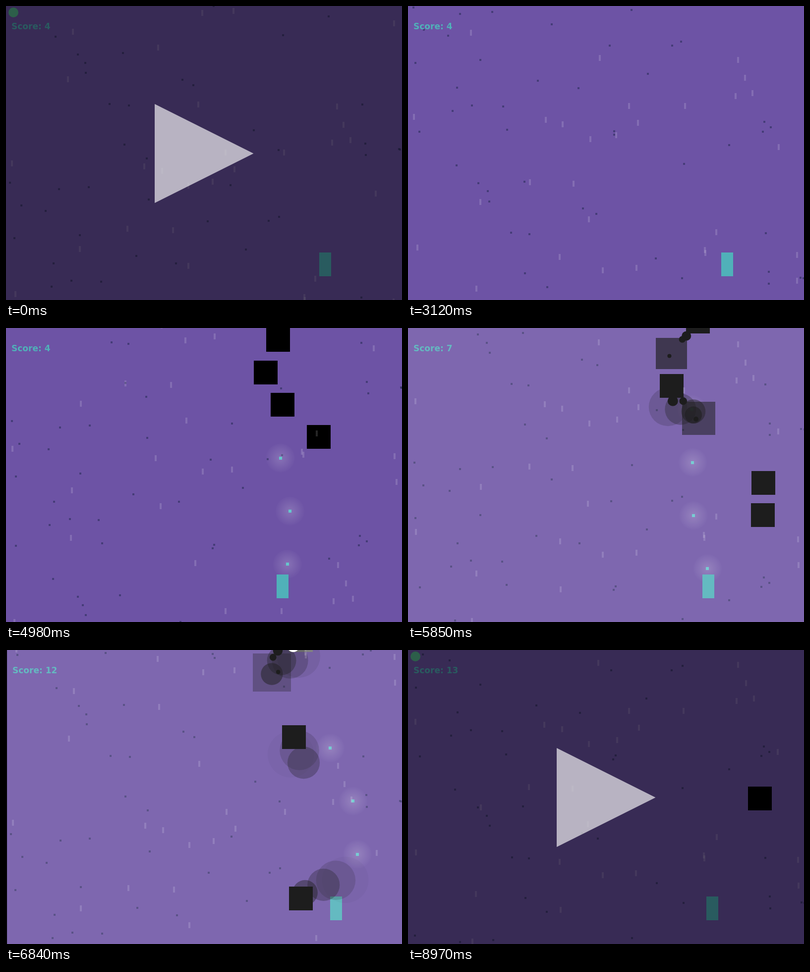
An HTML page with a canvas that plays this animation: 799 px wide and 594 px high, repeating every 9 s.

```html
<!DOCTYPE html>
<html lang="en">
<head>
<meta charset="utf-8">
<title>Arcade shooter</title>
<style>
html, body { margin: 0; width: 100%; height: 100%; overflow: hidden; background: #000; }
canvas { display: block; }
</style>
</head>
<body>
<canvas id="stage" width="799" height="594"></canvas>
<script>
const W = 799, H = 594, LOOP = 9000, STEP = 30;
const PAUSE_END = 510, PAUSE_START = 8970;
const ctx = document.getElementById('stage').getContext('2d');

// [time in ms, game clock]; hits slow the game down a little
const CLOCK = [[510, 0], [4980, 445], [5850, 529], [6840, 629.5], [7500, 697.5], [8880, 834.5]];

// [game clock, value]
const PLAYER = [[330, 644], [400, 553], [421, 573], [441, 573], [445, 558], [464, 573], [507, 576],
  [528, 604], [550, 658], [571, 652], [592, 698], [614, 707], [629, 662], [635, 680], [697, 614]];
const FLASH = [[466, 0], [470, .113], [676, .113], [682, .203], [698, .203], [740, 0]];

const SIZE = 48, REACH = 26;

function lerpKeys(keys, t) {
  if (t <= keys[0][0]) return keys[0][1];
  for (let i = 1; i < keys.length; i++) {
    const [t0, a] = keys[i - 1], [t1, b] = keys[i];
    if (t < t1) return a + (b - a) * (t - t0) / (t1 - t0);
  }
  return keys[keys.length - 1][1];
}

function noise(n) {
  const v = Math.sin(n * 127.1 + 11.7) * 43758.5453;
  return v - Math.floor(v);
}

const scatter = (count, seed) => Array.from({ length: count }, (_, i) => ({
  x: noise(seed + i) * W, y: noise(seed + i + .5) * 614, phase: i
}));
const dots = scatter(46, 100), streaks = scatter(30, 300);

// enemies snake down one behind the other
const enemies = Array.from({ length: 11 }, (_, id) => ({ id, killed: Infinity }));
function enemyAt(e, clock) {
  const y = 196 + 1.88 * (clock - 445) - 65.2 * e.id;
  return { x: 600 - 100 * Math.cos((y - 60) / 83), y };
}

// the player fires at a steady rate
const bullets = Array.from({ length: 14 }, (_, i) => {
  const fired = 399.5 + 21.45 * i;
  return { fired, x: lerpKeys(PLAYER, fired), gone: Infinity };
});
const bulletY = (b, clock) => 490 - 5 * (clock - b.fired);

// play the fight once to learn which bullet ends which enemy, and when
function fight() {
  for (let clock = 399; clock < 790; clock += .25) {
    for (const b of bullets) {
      const by = bulletY(b, clock);
      if (clock < b.fired || clock >= b.gone || by < -30) continue;
      const hit = enemies.find(e => {
        const p = enemyAt(e, clock);
        return e.killed > clock && by >= p.y && by <= p.y + SIZE && Math.abs(p.x + SIZE / 2 - b.x) < REACH;
      });
      if (hit) hit.killed = b.gone = clock;
    }
  }
}
fight();

function box(x, y, w, h, color) {
  ctx.fillStyle = color;
  ctx.fillRect(Math.round(x), Math.round(y), w, h);
}

function disc(x, y, r, color) {
  ctx.fillStyle = color;
  ctx.beginPath();
  ctx.arc(x, y, r, 0, Math.PI * 2);
  ctx.fill();
}

// particles fall, sway a little and wrap around
function drawField(parts, shift, clock, w, h, color) {
  for (const p of parts) {
    const x = p.x + 3 * Math.sin(clock / 50 + p.phase);
    const y = (p.y + shift) % 614 - 8;
    box(x - w / 2, y - h / 2, w, h, color);
  }
}

function drawEnemy(e, clock) {
  const { x, y } = enemyAt(e, clock);
  const age = clock - e.killed;
  if (age < 8) {
    const grey = age < 0 ? 0 : Math.round(190 * (1 - age / 8));
    box(x, y, SIZE, SIZE, `rgb(${grey},${grey},${grey})`);
  } else if (age < 37) {
    const grow = Math.round((age - 8) * 1.43);
    box(x - grow / 2, y - grow / 2, SIZE + grow, SIZE + grow, `rgba(0,0,0,${1 - (age - 8) / 29})`);
  }
}

// a dying enemy drops puffs that swell, blink white and burst into smoke
function drawSmoke(e, clock) {
  for (let i = 0; i < 4; i++) {
    const born = e.killed + i * 9, age = clock - born, burst = Math.max(0, age - 30);
    if (!(age >= 0 && burst < 45)) continue;
    const p = enemyAt(e, born), seed = e.id * 10 + i;
    const x = p.x + SIZE / 2 + (noise(seed) - .5) * 36;
    const y = p.y + SIZE / 2 + (noise(seed + .5) - .5) * 24 + burst * .7;
    const r = 4 + Math.min(age, 30) * .3 + burst * .8;
    const alpha = burst ? .65 * (1 - burst / 45) : 1;
    disc(x, y, r, age > 27 && !burst ? '#fff' : `rgba(0,0,0,${alpha})`);
  }
}

function drawBullet(b, clock) {
  if (clock < b.fired || clock >= b.gone) return;
  const y = bulletY(b, clock);
  const glow = ctx.createRadialGradient(b.x, y, 0, b.x, y, 29);
  glow.addColorStop(0, 'rgba(255,255,255,.18)');
  glow.addColorStop(1, 'rgba(255,255,255,.01)');
  disc(b.x, y, 29, glow);
  box(b.x - 3, y - 3, 6, 6, '#66c6cc');
}

function drawPause() {
  box(0, 0, W, H, 'rgba(0,0,0,.485)');
  disc(15, 13, 10, '#2d5f4a');
  ctx.fillStyle = 'rgba(255,255,255,.645)';
  ctx.beginPath();
  ctx.moveTo(300, 198);
  ctx.lineTo(499.5, 298);
  ctx.lineTo(300, 398);
  ctx.fill();
}

function draw(time) {
  const clock = lerpKeys(CLOCK, time);
  const dead = enemies.filter(e => clock >= e.killed);

  box(0, 0, W, H, '#000');
  ctx.save();
  if (dead.some(e => clock < e.killed + 30)) {
    const swing = Math.cos((clock - 629.5) * .1386);
    ctx.translate(Math.round(2 * swing), swing < -.5 ? 1 : 0);
  }
  box(0, -3, 800, 600, '#6d53a5');

  drawField(dots, clock, clock, 4, 4, 'rgba(38,42,84,.55)');
  for (const b of bullets) drawBullet(b, clock);
  for (const e of enemies) drawEnemy(e, clock);
  box(lerpKeys(PLAYER, clock) - 12, 498, 24, 48, '#50b1b9');
  for (const e of dead) drawSmoke(e, clock);
  drawField(streaks, clock * 2, clock, 4, 12, 'rgba(255,255,255,.15)');

  ctx.fillStyle = '#50b1b9';
  ctx.font = 'bold 17px "DejaVu Sans", sans-serif';
  ctx.fillText('Score: ' + (4 + dead.length), 11, 47);

  const flash = lerpKeys(FLASH, clock);
  if (flash > 0) box(0, -3, 800, 600, `rgba(255,255,255,${flash})`);
  ctx.restore();

  if (time < PAUSE_END || time >= PAUSE_START) drawPause();
}

const start = performance.now();
function tick() {
  const t = (performance.now() - start) % LOOP;
  draw(Math.floor(t / STEP) * STEP);
  requestAnimationFrame(tick);
}
tick();
</script>
</body>
</html>
```
